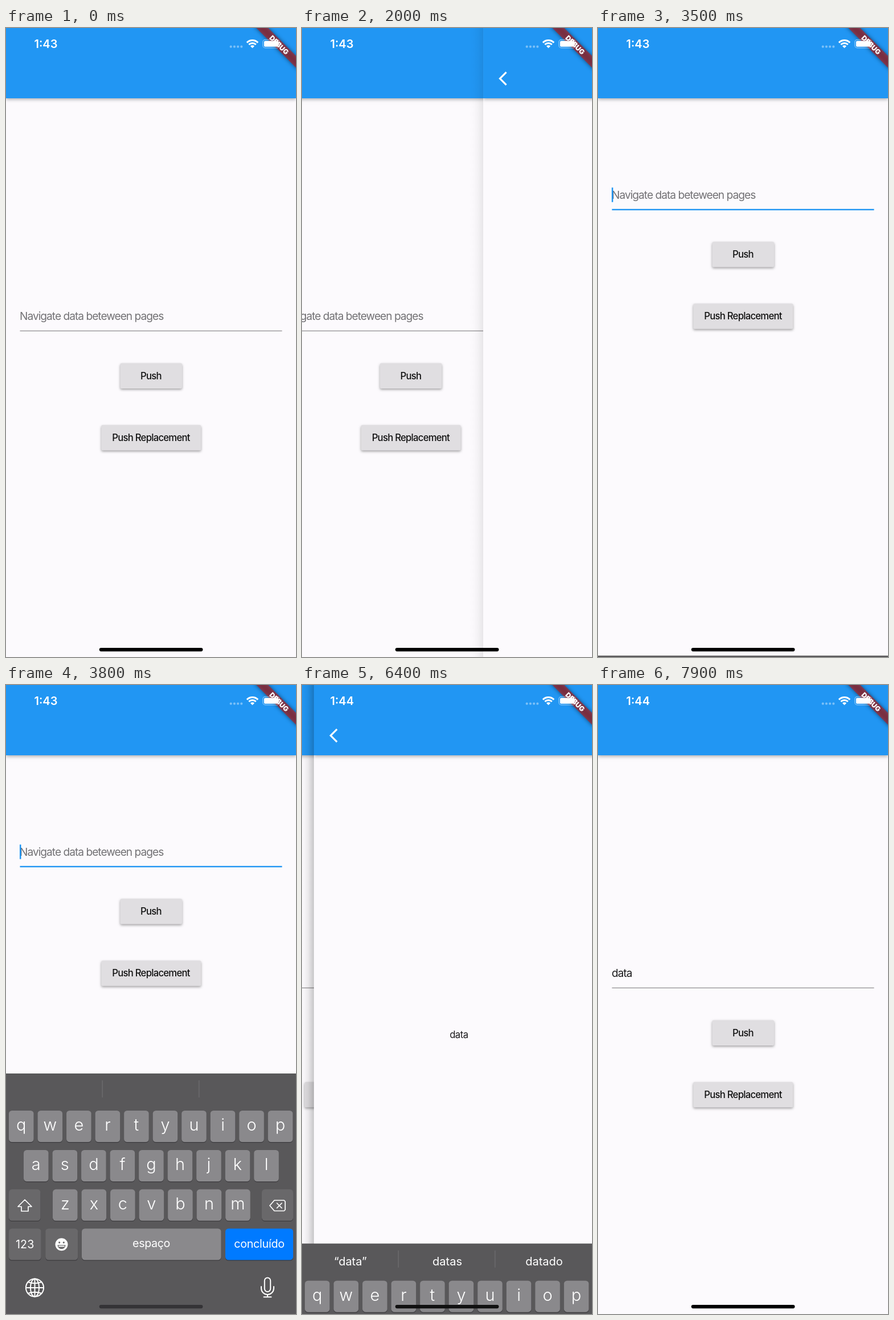
Write an HTML page with a canvas that moves like this. It is 509 px wide and 1101 px high and loops after 8 s.

```html
<!DOCTYPE html>
<html lang="en">
<head>
<meta charset="utf-8">
<title>Page navigation</title>
<style>
  html, body { margin: 0; width: 100%; height: 100%; overflow: hidden; background: #fcfafd; }
  canvas { display: block; }
</style>
</head>
<body>
<canvas id="stage" width="509" height="1101"></canvas>
<script>
const W = 509, H = 1101, LOOP = 8000, STEP = 100;
const BAR = 123, KEYS_H = 425;
const BLUE = '#2196f3', PAPER = '#fcfafd', KEY = '#8a898c', DARK_KEY = '#69686a';
const ctx = document.getElementById('stage').getContext('2d');

const clamp = v => Math.min(1, Math.max(0, v));

// Cubic bezier easing (.35, .91, .33, .97)
function ease(x) {
  x = clamp(x);
  if (x === 0 || x === 1) return x;
  const bez = (s, a, b) => 3 * (1 - s) ** 2 * s * a + 3 * (1 - s) * s * s * b + s ** 3;
  let lo = 0, hi = 1;
  for (let i = 0; i < 24; i++) {
    const mid = (lo + hi) / 2;
    if (bez(mid, .35, .33) < x) lo = mid; else hi = mid;
  }
  return bez(lo, .91, .97);
}

// Critically damped spring, time in ms
function spring(ms) {
  const x = Math.max(0, ms) * .022;
  return 1 - (1 + x) * Math.exp(-x);
}

function text(str, x, y, size, { weight = 400, color = '#fff', align = 'center', gap = 0 } = {}) {
  ctx.font = `${weight} ${size}px Inter, Roboto, sans-serif`;
  ctx.letterSpacing = gap + 'px';
  ctx.textAlign = align;
  ctx.fillStyle = color;
  ctx.fillText(str, x, y);
  return ctx.measureText(str).width;
}

function box(x, y, w, h, r, color) {
  ctx.fillStyle = color;
  ctx.beginPath();
  ctx.roundRect(x, y, w, h, r);
  ctx.fill();
}

function shade(color, blur, dy, draw) {
  ctx.save();
  ctx.shadowColor = color;
  ctx.shadowBlur = blur;
  ctx.shadowOffsetY = dy;
  draw();
  ctx.restore();
}

function poly(points, close) {
  ctx.beginPath();
  points.forEach(([x, y]) => ctx.lineTo(x, y));
  if (close) ctx.closePath();
}

function line(x1, y1, x2, y2) {
  poly([[x1, y1], [x2, y2]]);
  ctx.stroke();
}

function disc(x, y, r, color) {
  ctx.fillStyle = color;
  ctx.beginPath();
  ctx.arc(x, y, r, 0, 7);
  ctx.fill();
}

// Timeline
const routes = [[400, 1], [1900, 0], [6156, 1], [7500, 0]];
const FOCUS = 3495, BLUR = 6156, HIDE = 6287;
const typing = [4600, 4800, 5000, 5200];

function stateAt(t) {
  const route = routes.filter(r => r[0] <= t).pop();
  let page = 0;
  if (route) {
    const e = ease((t - route[0]) / 400);
    page = route[1] ? e : 1 - e;
  }
  const typed = typing.filter(k => k <= t);
  const focus = t >= FOCUS && t < BLUR;
  const blink = (t - (typed.length ? typed[typed.length - 1] : 3500)) % 1000;
  const cycled = t - (typed[typed.length - 1] || 3500) >= 1000;
  let cursor = blink < 500 ? 1 : 1 - clamp((blink - 500) / 250);
  if (cycled && blink < 250) cursor = blink / 250;
  return {
    page, focus, cursor,
    value: 'data'.slice(0, typed.length),
    keys: t < HIDE ? spring(t - FOCUS) : 1 - spring(t - HIDE),
    lift: t >= FOCUS && t < HIDE ? KEYS_H / 2 : 0,
    result: t > 6000 ? 'data' : '',
    clock: t < 6000 ? '1:43' : '1:44'
  };
}

function drawBase() {
  ctx.fillStyle = PAPER;
  ctx.fillRect(0, 0, W, H);
  shade('rgba(0,0,0,.32)', 6, 2, () => {
    ctx.fillStyle = BLUE;
    ctx.fillRect(0, 0, W, BAR);
  });
}

function button(label, x, y, w, baseline) {
  shade('rgba(0,0,0,.36)', 4, 2, () => box(x, y, w, 44.3, 2.5, '#e0dee1'));
  text(label, W / 2, baseline, 16.7, { weight: 500, color: '#111', gap: -.75 });
}

function drawHome(s) {
  drawBase();
  ctx.save();
  ctx.translate(0, -s.lift);
  const style = { color: s.value ? '#1d1c1e' : '#727174', align: 'left', gap: -.97 };
  const width = text(s.value || 'Navigate data beteween pages', 24, 511, 19.1, style);
  if (s.focus) {
    ctx.fillStyle = BLUE;
    ctx.fillRect(24.5, 529.2, 460, 2.4);
    ctx.globalAlpha = s.cursor;
    ctx.fillRect(s.value ? 24.5 + width : 24, 491.8, 2.5, 25.4);
    ctx.globalAlpha = 1;
  } else {
    ctx.fillStyle = '#89888b';
    ctx.fillRect(24.5, 529.6, 460, 1.2);
  }
  button('Push', 200.5, 586.8, 108.5, 614.8);
  button('Push Replacement', 167.3, 695, 175, 722.8);
  ctx.restore();
}

function drawDetail(s) {
  drawBase();
  ctx.fillStyle = '#fff';
  poly([[41.6, 78.5], [39.4, 76.3], [27.2, 88.5], [39.4, 100.7], [41.6, 98.5], [31.6, 88.5]], true);
  ctx.fill();
  text(s.result, W / 2, 618 - s.lift, 16.7, { color: '#1b1a1c', gap: -.5 });
}

function drawPages(s) {
  const x = (1 - s.page) * W;
  if (s.page < 1) {
    ctx.save();
    ctx.translate(-s.page * W / 3, 0);
    drawHome(s);
    ctx.restore();
  }
  if (s.page === 0) return;
  const edge = W * .05;
  const grad = ctx.createLinearGradient(x - edge, 0, x, 0);
  [[0, 0], [.3, 4], [.6, 18], [1, 56]].forEach(([at, a]) =>
    grad.addColorStop(at, `rgba(0,0,0,${a / 255 * s.page})`));
  ctx.fillStyle = grad;
  ctx.fillRect(x - edge, 0, edge, H);
  ctx.save();
  ctx.translate(x, 0);
  ctx.beginPath();
  ctx.rect(0, 0, W, H);
  ctx.clip();
  drawDetail(s);
  ctx.restore();
}

function drawBanner() {
  ctx.save();
  ctx.translate(W, 0);
  ctx.rotate(Math.PI / 4);
  ctx.filter = 'blur(3.7px)';
  ctx.fillStyle = 'rgba(0,0,0,.5)';
  ctx.fillRect(-55, 34.4, 110, 14.8);
  ctx.filter = 'none';
  ctx.fillStyle = 'rgba(183,28,28,.627)';
  ctx.fillRect(-55, 34.4, 110, 14.8);
  text('DEBUG', 0, 46.2, 12, { weight: 900 });
  ctx.restore();
}

function drawStatus(clock) {
  text(clock, 49.5, 35, 20, { weight: 600, align: 'left' });
  for (let i = 0; i < 4; i++) disc(394.7 + i * 6.2, 32.7, 2.1, 'rgba(255,255,255,.4)');

  // Wi-Fi fan
  ctx.save();
  ctx.beginPath();
  ctx.moveTo(432.5, 35.2);
  ctx.arc(432.5, 35.2, 18, -Math.PI * .75, -Math.PI * .25);
  ctx.clip();
  ctx.strokeStyle = '#fff';
  ctx.lineWidth = 3;
  [13.6, 8.7].forEach(r => {
    ctx.beginPath();
    ctx.arc(432.5, 35.2, r, 0, 7);
    ctx.stroke();
  });
  disc(432.5, 35.2, 5, '#fff');
  ctx.restore();

  // Battery
  ctx.strokeStyle = 'rgba(255,255,255,.45)';
  ctx.lineWidth = 1.2;
  ctx.beginPath();
  ctx.roundRect(450.8, 20.4, 29.4, 14.4, 4.4);
  ctx.stroke();
  box(452.9, 22.4, 25.2, 10.4, 2.6, '#fff');
  box(481.8, 25.2, 1.7, 4.8, 1, 'rgba(255,255,255,.45)');
}

function key(x, y, w, color) {
  box(x, y + 1.3, w, 55, 5.5, '#3c3b3e');
  box(x, y, w, 55, 5.5, color);
}

function letters(row, x, y) {
  [...row].forEach((ch, i) => {
    const left = x + i * 50.53;
    key(left, y, 43.6, KEY);
    text(ch, left + 21.8, y + 35, 29, { weight: 300 });
  });
}

function drawIcons() {
  ctx.strokeStyle = '#fff';
  ctx.lineWidth = 1.7;
  ctx.lineJoin = ctx.lineCap = 'round';

  // Shift
  poly([[33, 221], [45, 233], [39, 233], [39, 241], [27, 241], [27, 233], [21, 233]], true);
  ctx.stroke();

  // Backspace
  poly([[463, 231.3], [471, 222], [488, 222], [490, 224], [490, 238.5], [488, 240.5], [471, 240.5]], true);
  ctx.stroke();
  line(475.5, 227, 484, 235.5);
  line(484, 227, 475.5, 235.5);

  // Smiling face
  disc(97.5, 299.3, 11, '#fff');
  disc(93.7, 295.8, 1.6, DARK_KEY);
  disc(101.3, 295.8, 1.6, DARK_KEY);
  ctx.fillStyle = DARK_KEY;
  ctx.beginPath();
  ctx.arc(97.5, 300.3, 7, 0, Math.PI);
  ctx.fill();
  ctx.fillStyle = '#fff';
  ctx.fillRect(92.3, 301.4, 10.4, 2);

  // Globe
  ctx.lineWidth = 2;
  for (const rx of [15.6, 7.6]) {
    ctx.beginPath();
    ctx.ellipse(50.5, 375, rx, 15.6, 0, 0, 7);
    ctx.stroke();
  }
  line(50.5, 359.4, 50.5, 390.6);
  line(35, 375, 66, 375);
  for (const d of [-1, 1]) {
    ctx.beginPath();
    ctx.moveTo(38.5, 375 + d * 10);
    ctx.quadraticCurveTo(50.5, 375 + d * 5.5, 62.5, 375 + d * 10);
    ctx.stroke();
  }

  // Microphone
  ctx.beginPath();
  ctx.roundRect(453.8, 357.5, 10.4, 24.5, 5.2);
  ctx.stroke();
  ctx.beginPath();
  ctx.moveTo(448, 373);
  ctx.lineTo(448, 376);
  ctx.arc(459, 376, 11, Math.PI, 0, true);
  ctx.lineTo(470, 373);
  ctx.stroke();
  line(459, 387, 459, 391);
  line(452.5, 391.3, 465.5, 391.3);
}

function drawKeyboard(s) {
  if (s.keys < .001) return;
  ctx.save();
  ctx.translate(0, H - KEYS_H * s.keys);
  ctx.fillStyle = '#59585a';
  ctx.fillRect(0, 0, W, KEYS_H + 10);
  ctx.fillStyle = '#747376';
  ctx.fillRect(168.6, 12, 1, 30);
  ctx.fillRect(338.4, 12, 1, 30);
  if (s.value) text(`“${s.value}”`, 85, 38.5, 20);
  if (s.value === 'data') {
    text('datas', 255, 38.5, 20);
    text('datado', 425, 38.5, 20);
  }
  letters('qwertyuiop', 5, 65);
  letters('asdfghjkl', 31, 134);
  letters('zxcvbnm', 82, 202.8);
  key(5, 202.8, 55.5, DARK_KEY);
  key(449, 202.8, 55, DARK_KEY);
  key(5, 271.5, 56.7, DARK_KEY);
  key(69.2, 271.5, 57, DARK_KEY);
  key(133, 271.5, 244.5, KEY);
  key(385, 271.5, 119, '#007aff');
  text('123', 33.2, 306, 19.7);
  text('espaço', 255, 304.5, 19.7, { gap: -.4 });
  text('concluído', 444.5, 304.8, 19.7, { gap: -.25 });
  drawIcons();
  ctx.restore();
}

function frame(now) {
  const t = Math.floor(now % LOOP / STEP) * STEP;
  const s = stateAt(t);
  drawPages(s);
  drawBanner();
  drawKeyboard(s);
  drawStatus(s.clock);
  box(163.7, 1085, 181.8, 6.2, 3.1, s.keys > .9 ? '#343336' : s.keys > .02 ? '#111' : '#000');
}

let start;
function tick(now) {
  start ??= now;
  frame(now - start);
  requestAnimationFrame(tick);
}
frame(0);
requestAnimationFrame(tick);
</script>
</body>
</html>
```
